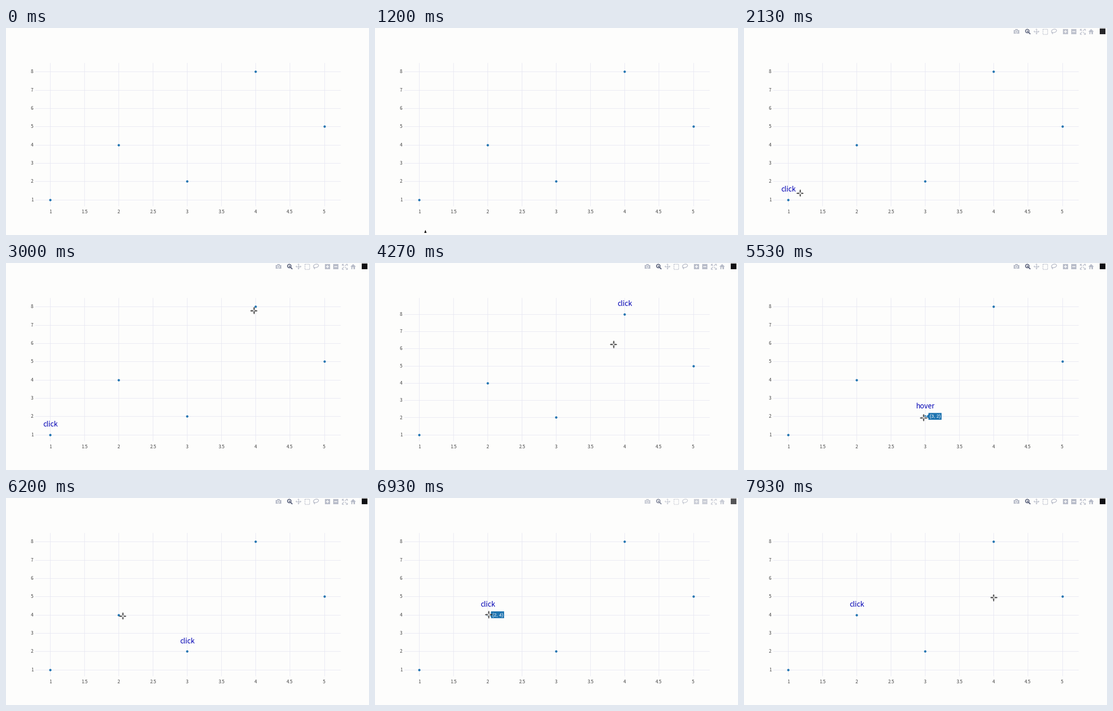
These frames come from a looping animation (700x400 px, 8000 ms). A matplotlib script:

```python
import math

import matplotlib.pyplot as plt
from matplotlib.animation import FuncAnimation
from matplotlib.collections import LineCollection
from matplotlib.patches import Circle, Ellipse, Polygon, Rectangle

W, H, DPI = 700, 400, 100
PX = 72 / DPI  # points per pixel
LOOP, STEP = 8000, 40

BG = "#fdfdfc"
GRID = "#e7e7f2"
BLUE = "#1f74b0"
ICON = "#b8bcc9"
ACTIVE = "#555d78"
SANS = "Noto Sans CJK JP"

POINTS = [(1, 1), (2, 4), (3, 2), (4, 8), (5, 5)]
LEFT, RIGHT, TOP, BOTTOM = 56, 645, 66.5, 344
Y_STEP, Y_STEP_TIGHT = 35.36, 33.29

# (time, label, index of the annotated point)
EVENTS = [
    (1400, "hover", 0), (1930, "click", 0),
    (3060, "hover", 3), (3670, "click", 3),
    (4900, "hover", 2), (5590, "click", 2),
    (6300, "hover", 1), (6800, "click", 1),
]
ENTER = 1200
BAR_IN = 1230
FADE = 300
HOVER_RADIUS = 14

# (start, end, from, control, to)
MOVES = [
    (1210, 1400, (97, 393), (91, 362), (86, 333)),
    (2000, 3000, (86, 333), (290, 200), (477.5, 91.5)),
    (3840, 4890, (477.5, 91.5), (474, 179), (346, 298.5)),
    (5690, 6300, (346, 298.5), (280, 255), (219, 225)),
    (6960, 8560, (219, 225), (416, 186), (613, 190)),
]

fig = plt.figure(figsize=(W / DPI, H / DPI), dpi=DPI, facecolor=BG)
ax = fig.add_axes([0, 0, 1, 1])
ax.set_xlim(0, W)
ax.set_ylim(H, 0)
ax.axis("off")


def x_px(x):
    return 85.3 + 132.05 * (x - 1)


def y_px(y, step):
    return 331.7 - step * (y - 1)


def label(x, y, text, size, color, ha="center", font=SANS, z=5):
    return ax.text(x, y, text, fontsize=size * PX, color=color, ha=ha,
                   va="baseline", family=font, zorder=z)


def stroke(xs, ys, color, width, z=6, cap="butt"):
    line, = ax.plot(xs, ys, color=color, lw=width * PX, zorder=z,
                    solid_capstyle=cap)
    return line


# Grid, ticks and markers
x_ticks = [1 + k / 2 for k in range(9)]
y_ticks = range(1, 9)
ax.add_collection(LineCollection(
    [[(x_px(v), TOP), (x_px(v), BOTTOM)] for v in x_ticks],
    colors=GRID, linewidths=0.9 * PX, zorder=1))
rows = LineCollection([], colors=GRID, linewidths=0.9 * PX, zorder=1)
ax.add_collection(rows)
for v in x_ticks:
    label(x_px(v), 357.7, f"{v:g}", 8.8, "#444444")
y_labels = [label(52.8, 0, str(v), 8.8, "#444444", ha="right") for v in y_ticks]
dots, = ax.plot([], [], "o", ms=4.5 * PX, mew=0, color=BLUE, zorder=3,
                snap=False)
note = label(0, 0, "", 13.4, "#0000b4")

# Tooltip
tip_box = ax.add_patch(Polygon([(0, 0)] * 3, fc=BLUE, ec="none", zorder=7))
tip_text = label(0, 0, "", 9.1, "white", font="Liberation Sans", z=8)


def toolbar():
    parts = []

    def fill(patch, color=ICON, z=6):
        patch.set(facecolor=color, edgecolor="none", zorder=z)
        parts.append(ax.add_patch(patch))

    def line(xs, ys, color=ICON, width=1.2, z=6):
        parts.append(stroke(xs, ys, color, width, z))

    def outline(patch, color, width, **style):
        patch.set(fill=False, edgecolor=color, linewidth=width * PX,
                  zorder=6, **style)
        parts.append(ax.add_patch(patch))

    # Camera
    fill(Rectangle((519.5, 3.8), 11.5, 7.4))
    fill(Rectangle((523, 2.4), 4.5, 2))
    fill(Circle((525.2, 7.4), 2.7), BG, 7)
    fill(Circle((525.2, 7.4), 1.6), ICON, 8)
    # Magnifier
    outline(Circle((546.3, 5.9), 3.4), ACTIVE, 1.6)
    line([548.8, 552.2], [8.4, 11.8], ACTIVE, 2)
    line([544.6, 548], [5.9, 5.9], ACTIVE, 1)
    line([546.3, 546.3], [4.2, 7.6], ACTIVE, 1)
    # Four-way arrow
    cx, cy = 564, 6.8
    line([cx - 4, cx + 4], [cy, cy])
    line([cx, cx], [cy - 4, cy + 4])
    for dx, dy in ((1, 0), (-1, 0), (0, 1), (0, -1)):
        fill(Polygon([(cx + 5.6 * dx, cy + 5.6 * dy),
                      (cx + 3.4 * dx + 2 * dy, cy + 3.4 * dy + 2 * dx),
                      (cx + 3.4 * dx - 2 * dy, cy + 3.4 * dy - 2 * dx)]))
    # Box and lasso selection
    outline(Rectangle((575.6, 2), 9.8, 9.8), ICON, 1.3, linestyle=(0, (1.5, 1)))
    outline(Ellipse((597.8, 5.6), 10, 6.4, angle=-15), ICON, 1.3)
    line([594.4, 593.4, 595.4, 594.6], [7.8, 9.4, 10.2, 12])
    # Zoom in, zoom out
    for cx in (619.5, 636):
        fill(Rectangle((cx - 5, 1.8), 10, 10))
        line([cx - 3, cx + 3], [6.8, 6.8], BG, 1.5, 7)
    line([619.5, 619.5], [3.8, 9.8], BG, 1.5, 7)
    # Autoscale
    cx, cy = 652.8, 6.8
    for sx in (-1, 1):
        for sy in (-1, 1):
            line([cx + 1 * sx, cx + 4.6 * sx], [cy + 1 * sy, cy + 4.6 * sy])
            line([cx + 2 * sx, cx + 5 * sx, cx + 5 * sx],
                 [cy + 5 * sy, cy + 5 * sy, cy + 2 * sy])
    # Home
    fill(Polygon([(664, 7.2), (669.4, 2), (674.8, 7.2)]))
    fill(Rectangle((665.6, 6.8), 7.6, 4.8))
    fill(Rectangle((668.4, 8.2), 2, 3.4), BG, 7)
    # Badge
    fill(Rectangle((686, 1.4), 11, 11), "#101014")
    return parts


bar = toolbar()

# Cursors: arrow outside the plot, crosshair inside
arrow = ax.add_patch(Polygon([(0, 0)] * 3, fc="#101010", ec="none", zorder=10))
halo = LineCollection([], colors="#d8d8d8", linewidths=4.4 * PX, zorder=10)
cross = LineCollection([], colors="#101010", linewidths=1.4 * PX, zorder=11)
ax.add_collection(halo)
ax.add_collection(cross)


def arms(x, y, inner, outer):
    return [[(x + dx * inner, y + dy * inner), (x + dx * outer, y + dy * outer)]
            for dx, dy in ((1, 0), (-1, 0), (0, 1), (0, -1))]


def cursor_at(t):
    pos = MOVES[0][2]
    for start, end, a, c, b in MOVES:
        if t < start:
            break
        u = min(1, (t - start) / (end - start))
        s = u * u * (3 - 2 * u)
        pos = tuple((1 - s) ** 2 * p + 2 * s * (1 - s) * q + s * s * r
                    for p, q, r in zip(a, c, b))
    return pos


def draw_chart(step):
    ys = [y_px(v, step) for v in y_ticks]
    rows.set_segments([[(LEFT, y), (RIGHT, y)] for y in ys])
    for text, y in zip(y_labels, ys):
        text.set_y(y + 3.1)
    dots.set_data([x_px(x) for x, _ in POINTS],
                  [y_px(y, step) for _, y in POINTS])


def draw_note(event, step, mouse):
    shown = event is not None
    note.set_visible(shown)
    near = False
    if shown:
        _, word, index = event
        vx, vy = POINTS[index]
        x, y = x_px(vx), y_px(vy, step)
        note.set_text(word)
        note.set_position((x, y - 15.2))
        near = math.dist(mouse, (x, y)) < HOVER_RADIUS
        tip_box.set_xy([(x + 2.5, y), (x + 6.3, y - 4), (x + 6.3, y - 6.6),
                        (x + 31.6, y - 6.6), (x + 31.6, y + 6.6),
                        (x + 6.3, y + 6.6), (x + 6.3, y + 4)])
        tip_text.set_text(f"({vx}, {vy})")
        tip_text.set_position((x + 19, y + 3.1))
    tip_box.set_visible(near)
    tip_text.set_visible(near)


def draw_cursor(t, x, y):
    inside = y < BOTTOM
    arrow.set_visible(t >= ENTER and not inside)
    arrow.set_xy([(x + 0.3, y - 2.4), (x - 2, y + 3.4), (x + 2.6, y + 3.4)])
    for lines, inner, outer in ((halo, 0, 5.2), (cross, 1.8, 6.6)):
        lines.set_visible(t >= ENTER and inside)
        lines.set_segments(arms(x, y, inner, outer))


def draw_bar(t, event):
    # The toolbar fades in anew whenever the chart is redrawn
    since = event[0] if event else BAR_IN
    u = min(1, max(0, (t - since) / FADE))
    for part in bar:
        part.set_alpha(1 - (1 - u) ** 2)


def update(i):
    t = (i + 0.5) * STEP  # middle of the time the frame is shown
    event = next((e for e in reversed(EVENTS) if e[0] <= t), None)
    tight = event is not None and event[2] == 3
    step = Y_STEP_TIGHT if tight else Y_STEP
    mouse = cursor_at(t)
    draw_chart(step)
    draw_note(event, step, mouse)
    draw_cursor(t, *mouse)
    draw_bar(t, event)
    return []


anim = FuncAnimation(fig, update, frames=LOOP // STEP, interval=STEP,
                     init_func=lambda: update(0), repeat=True, repeat_delay=0)
plt.show()
```
